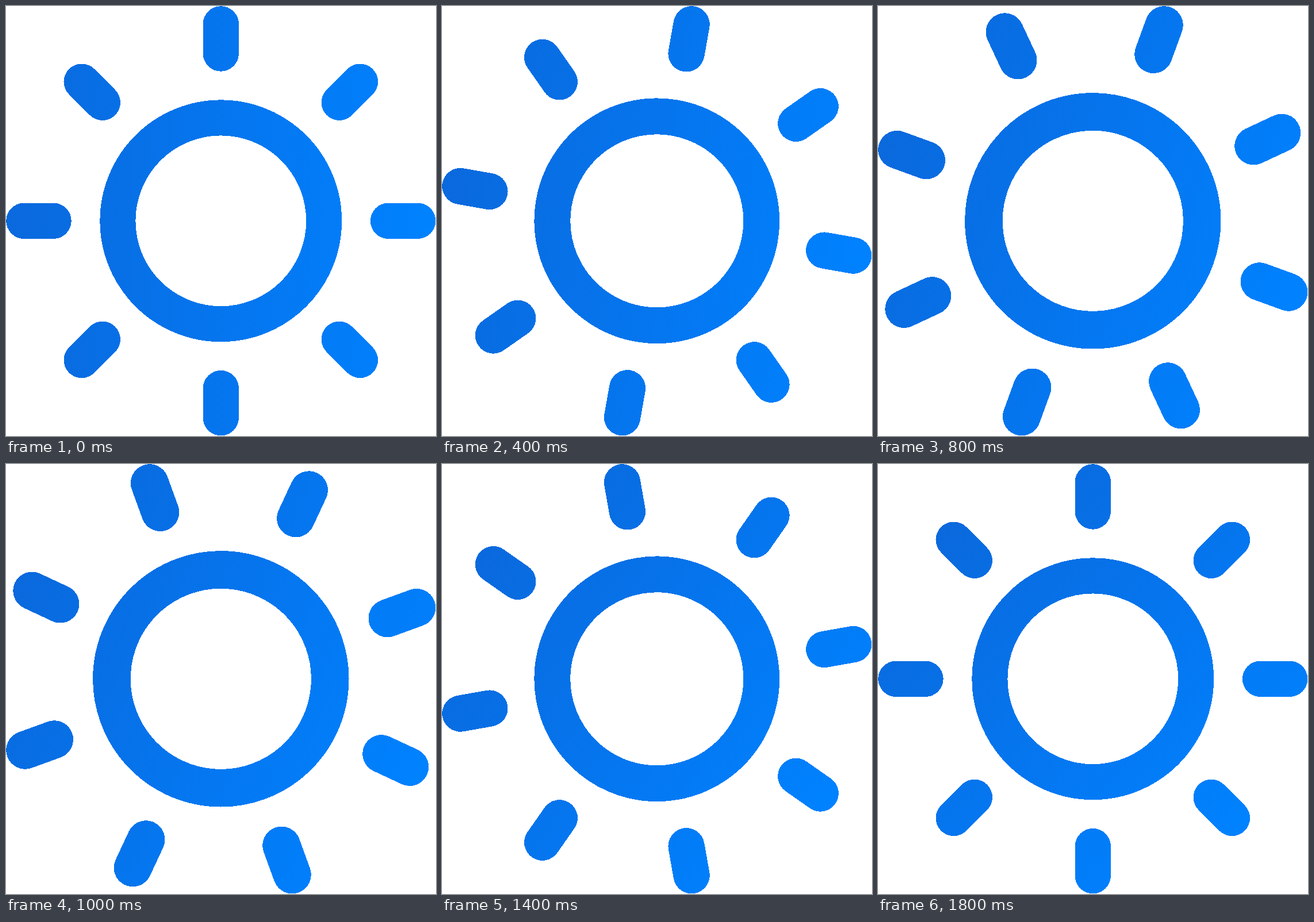
These frames come from a looping animation (748 px wide and 748 px high, 2000 ms). An HTML page:

```html
<!DOCTYPE html>
<html lang="en">
<head>
<meta charset="utf-8">
<title>Turning sun</title>
<style>
  html, body { margin: 0; width: 100%; height: 100%; overflow: hidden; background: #fff; }
  svg { display: block; width: 748px; height: 748px; }
  .sun {
    fill: none;
    stroke: url(#blue);
    transform-origin: 0 0;
    animation: turn 2s steps(10, end) infinite, fit 2s step-end infinite;
  }
  .rays { stroke-width: 62.4px; stroke-linecap: round; }
  .disc { stroke-width: 62px; }

  @keyframes turn { from { rotate: 0deg; } to { rotate: 50deg; } }

  /* Keeps the outermost rays touching the stage edges */
  @keyframes fit {
    0%, 90%, 100% { scale: 1; }
    10%, 80% { scale: 1.0035; }
    20%, 70% { scale: 1.0141; }
    30%, 60% { scale: 1.0323; }
    40%, 50% { scale: 1.0585; }
  }
</style>
</head>
<body>
<svg viewBox="-373.8 -373.8 748 748" shape-rendering="crispEdges">
  <defs>
    <linearGradient id="blue" gradientUnits="userSpaceOnUse" x1="-374" y1="0" x2="374" y2="0">
      <stop offset="0" stop-color="#0a69dd"/>
      <stop offset="1" stop-color="#0082ff"/>
    </linearGradient>
  </defs>
  <g class="sun">
    <circle class="disc" r="179.4"/>
    <path class="rays" d="M0-291.3V-342.4M0 291.3V342.4M-291.3 0H-342.4M291.3 0H342.4
      M206-206L242.1-242.1M206 206L242.1 242.1M-206 206L-242.1 242.1M-206-206L-242.1-242.1"/>
  </g>
</svg>
</body>
</html>
```
